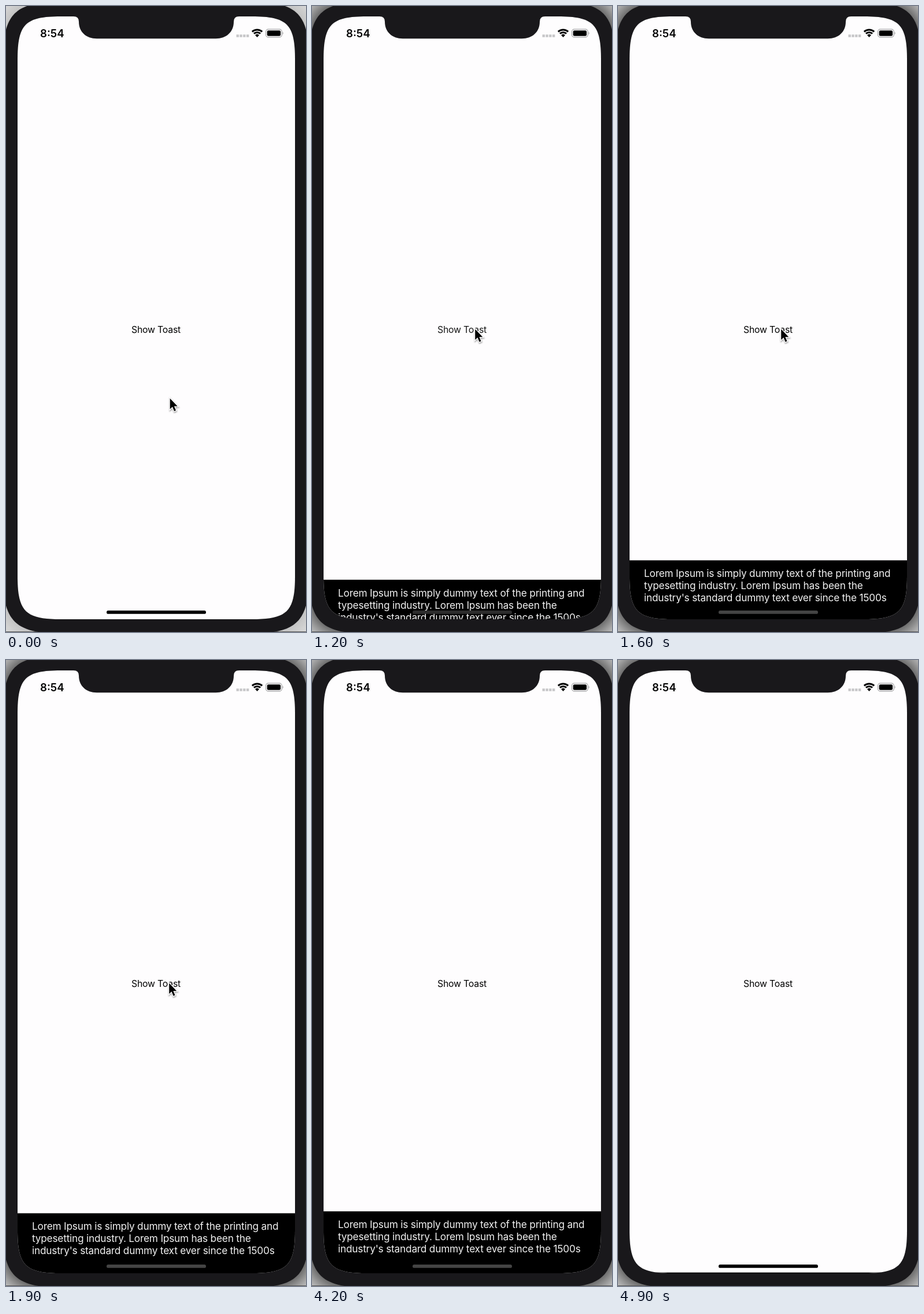
Write an HTML page that moves like this. It is 519 px wide and 1080 px high and loops after 5 s.

```html
<!DOCTYPE html>
<html lang="en">
<head>
<meta charset="utf-8">
<title>Toast demo</title>
<style>
  html, body { margin: 0; width: 100%; height: 100%; overflow: hidden; background: #e4e4e4; }
  svg { display: block; width: 100%; height: 100%; }
  text { font-family: Inter, "Liberation Sans", sans-serif; }
</style>
</head>
<body>
<svg viewBox="0 0 519 1080" xmlns="http://www.w3.org/2000/svg">
  <defs>
    <clipPath id="screenClip"><path id="screen"/></clipPath>
    <filter id="blur" x="-20%" y="-20%" width="140%" height="140%"><feGaussianBlur stdDeviation="20"/></filter>
    <filter id="soft" x="-50%" y="-50%" width="200%" height="200%"><feGaussianBlur stdDeviation="1.2"/></filter>
    <path id="arrow" d="M0 0V18.5L4.2 14.6 7.3 22 10.3 20.7 7.2 13.4H13Z"/>
  </defs>

  <rect width="519" height="1080" fill="#e4e4e4"/>
  <path id="shadow" filter="url(#blur)"/>
  <rect y="1079" width="519" height="1" fill="#555"/>
  <path id="body" fill="#19181b"/>

  <g clip-path="url(#screenClip)">
    <rect x="20" y="18" width="480" height="1040" fill="#fefdfe"/>
    <text id="button" x="259.5" y="564" font-size="15.8" letter-spacing="-.2" text-anchor="middle">Show Toast</text>
    <g id="toast">
      <rect x="20" width="480" height="140"/>
      <g fill="#f2f2f2" font-size="17.25" letter-spacing="-.21">
        <text x="45" y="28.8">Lorem Ipsum is simply dummy text of the printing and</text>
        <text x="45" y="49.8">typesetting industry. Lorem Ipsum has been the</text>
        <text x="45" y="70.8">industry's standard dummy text ever since the 1500s</text>
      </g>
    </g>
    <rect id="home" x="174" y="1043" width="172" height="5.8" rx="2.9"/>
  </g>

  <path d="M114 17V18H117Q126 18 126 27C126 45 139 56.2 157 56.2H363C381 56.2 394 45 394 27Q394 18 403 18H406V17Z" fill="#19181b"/>

  <text x="59" y="54" font-size="18.6" font-weight="600">8:54</text>
  <path d="M398.5 51.5H420.5" stroke="#c6c6c8" stroke-width="4.4" stroke-dasharray="4.4 1.4"/>
  <g id="wifi" fill="none" stroke="#000" stroke-width="3"></g>
  <rect x="449.6" y="40.2" width="27.6" height="13.6" rx="4" fill="none" stroke="#a0a0a2" stroke-width="1.2"/>
  <rect x="451.7" y="42.2" width="23.4" height="9.6" rx="2.3"/>
  <path d="M478.6 44.6Q481 47 478.6 49.4Z" fill="#a0a0a2"/>

  <g id="pointer">
    <use href="#arrow" x=".5" y="1.5" stroke="#000" stroke-width="3" opacity=".35" filter="url(#soft)"/>
    <use href="#arrow" stroke="#fff" stroke-width="2.6"/>
    <use href="#arrow"/>
  </g>
</svg>
<script>
const LOOP = 5000, TICK = 100;
const $ = id => document.getElementById(id);
const clamp = v => Math.min(1, Math.max(0, v));
const mix = (a, b, k) => a + (b - a) * k;
const progress = (t, from, to) => clamp((t - from) / (to - from));
const ease = k => k * k * (3 - 2 * k);

// Rectangle with continuous-curvature corners of nominal radius r.
function smoothRect(left, top, right, bottom, r) {
  const a = 1.528 * r, b = 0.27 * r;
  return `M${left} ${top + a}C${left} ${top + b} ${left + b} ${top} ${left + a} ${top}` +
    `H${right - a}C${right - b} ${top} ${right} ${top + b} ${right} ${top + a}` +
    `V${bottom - a}C${right} ${bottom - b} ${right - b} ${bottom} ${right - a} ${bottom}` +
    `H${left + a}C${left + b} ${bottom} ${left} ${bottom - b} ${left} ${bottom - a}Z`;
}
$('screen').setAttribute('d', smoothRect(20, 18, 500, 1058, 49));
$('body').setAttribute('d', smoothRect(-6, -8, 525, 1083, 72));
$('shadow').setAttribute('d', smoothRect(-14, -16, 533, 1091, 72));

// Wi-Fi fan: two arcs and a wedge around one centre.
function arc(r) {
  const dx = r * Math.sin(0.73), y = 54 - r * Math.cos(0.73);
  return `M${434.5 - dx} ${y}A${r} ${r} 0 0 1 ${434.5 + dx} ${y}`;
}
$('wifi').innerHTML =
  `<path d="${arc(13)}"/><path d="${arc(8.4)}"/>` +
  `<path d="${arc(5.2)}L434.5 54Z" fill="#000" stroke="none"/>`;

// Critically damped spring: share of the distance still left.
function springLeft(ms) {
  const x = 0.009 * Math.max(0, ms);
  return (1 + x) * Math.exp(-x);
}

const HIDDEN = 1058, SHOWN = 954.3, RAISED = 950.7;

function toastTop(t) {
  if (t < 950) return 1090;
  if (t < 4200) return mix(SHOWN, HIDDEN, springLeft(t - 950));
  return mix(HIDDEN, RAISED, springLeft(t - 4189));
}

function pointerAt(t) {
  const approach = ease(progress(t, 200, 600));
  const leave = progress(t, 2200, 2400);
  return [283.7 - 1.5 * approach - 2.5 * leave, 677 - 119.5 * approach - 132 * leave];
}

function draw(t) {
  $('shadow').setAttribute('opacity', t < 1000 ? 0.22 : 0.8);
  $('button').setAttribute('opacity', t < 1000 ? 1 : mix(0.5, 1, progress(t, 1000, 1240)));
  $('toast').setAttribute('transform', `translate(0 ${toastTop(t)})`);

  const light = Math.round(68 * progress(t, 1000, 1300) * (1 - progress(t, 4500, 4700)));
  $('home').setAttribute('fill', `rgb(${light},${light},${light})`);

  $('pointer').setAttribute('transform', `translate(${pointerAt(t)})`);
  $('pointer').setAttribute('visibility', t < 2500 ? 'visible' : 'hidden');
}

const start = performance.now();
function frame() {
  const t = (performance.now() - start) % LOOP;
  draw(Math.floor(t / TICK) * TICK);
  requestAnimationFrame(frame);
}
frame();
</script>
</body>
</html>
```
